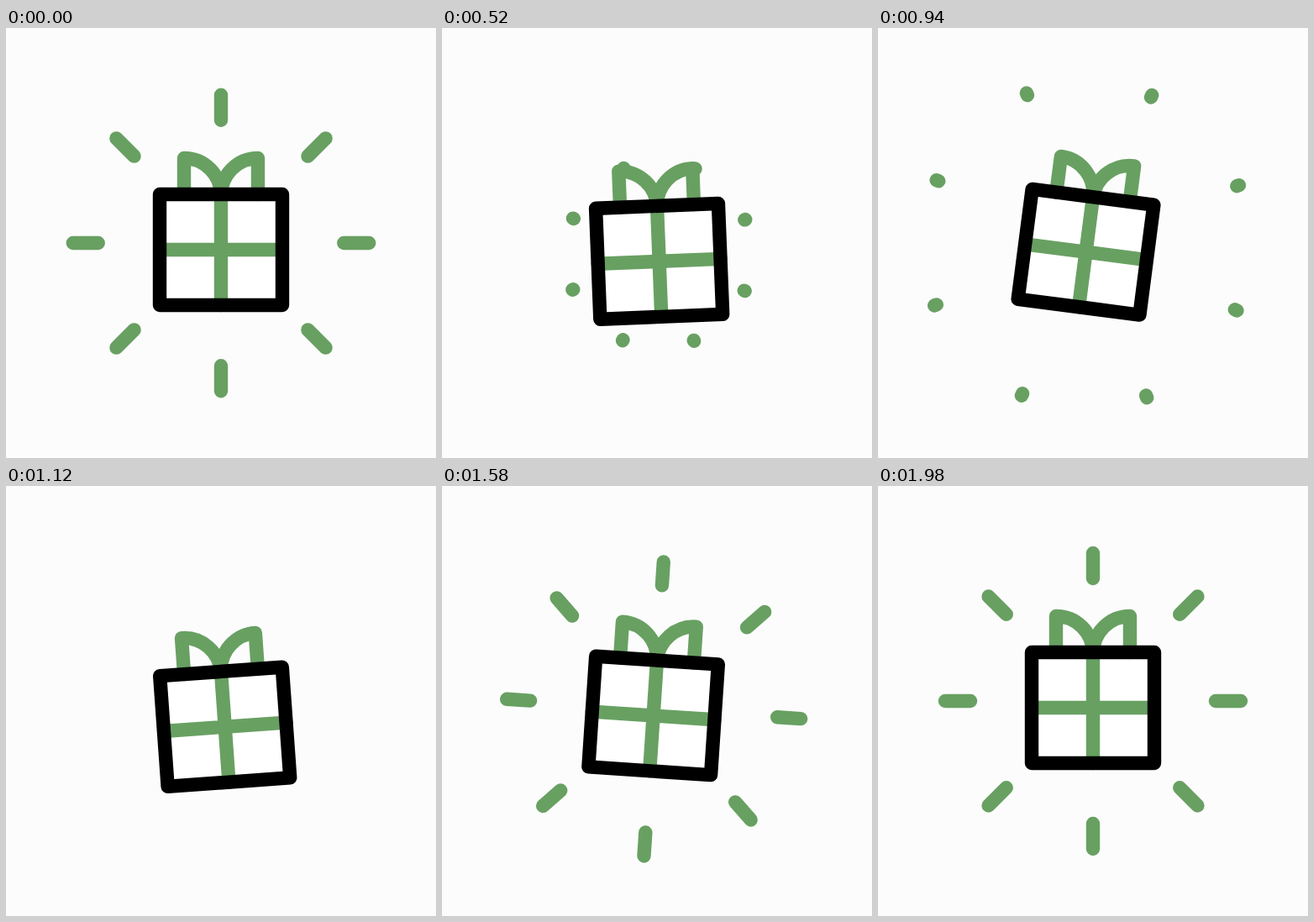
Recreate the animation shown at these times as an HTML page. Size 512x512 px, loop 2 s.

```html
<!DOCTYPE html>
<html lang="en">
<head>
<meta charset="utf-8">
<title>Bouncing gift</title>
<style>
  html, body { margin: 0; width: 100%; height: 100%; overflow: hidden; background: #fcfcfc; }
  svg { display: block; width: 100%; height: 100%; }
  path, rect { fill: none; stroke-width: 16.4; stroke-linecap: round; stroke-linejoin: round; }
  .green { stroke: #68a062; }
  .box { stroke: #000; }
</style>
</head>
<body>
<svg viewBox="0 0 512 512">
  <path id="firstRays" class="green"/>
  <g id="gift">
    <path id="rays" class="green"/>
    <rect x="183" y="198" width="146" height="132" style="fill:#fff"/>
    <path class="green" d="M212 198V155A44 44 0 0 1 256 199A44 44 0 0 1 300 155V198M256 198V330M183 264H329"/>
    <rect class="box" x="183" y="198" width="146" height="132"/>
  </g>
</svg>
<script>
const LOOP = 2000;
const PIVOT_Y = 198;
const byId = id => document.getElementById(id);
const gift = byId('gift'), rays = byId('rays'), firstRays = byId('firstRays');

// Smooth curve through [time, value] keys, flat at every peak.
function curve(...keys) {
  const slope = i => (keys[i + 1][1] - keys[i][1]) / (keys[i + 1][0] - keys[i][0]);
  const tangents = keys.map((_, i) => {
    if (i === 0 || i === keys.length - 1) return 0;
    const a = slope(i - 1), b = slope(i);
    return a * b <= 0 ? 0 : 2 * a * b / (a + b);
  });
  return t => {
    if (t <= keys[0][0]) return keys[0][1];
    const i = keys.findIndex(key => key[0] > t) - 1;
    if (i < 0) return keys[keys.length - 1][1];
    const [t0, v0] = keys[i], [t1, v1] = keys[i + 1];
    const d = t1 - t0, u = (t - t0) / d, w = 1 - u;
    return v0 * (1 + 2 * u) * w * w + v1 * u * u * (3 - 2 * u)
      + d * u * w * (tangents[i] * w - tangents[i + 1] * u);
  };
}

const drop = curve([0, 0], [270, 30.8], [520, 14], [730, -29], [780, -25.5], [870, -8],
  [980, 9], [1090, 24], [1120, 23], [1410, -10], [1580, 9.5], [1632, 13], [1980, 0]);
const tilt = curve([0, 0], [270, -4.1], [520, -2.3], [780, 11.6], [855, 19], [980, 2],
  [1090, -4.1], [1120, -4.1], [1410, 0], [1580, 3.8], [1620, 4.1], [1980, 0]);

const bursts = [
  { from: 0, to: 200, turn: () => 0,
    outer: curve([-60, 160], [0, 176], [100, 195]),
    inner: curve([-60, 130], [0, 146], [200, 195]) },
  { from: 508, to: 985, turn: t => 25.2 - (t - 520) * 0.0217,
    outer: curve([500, 110], [520, 111], [780, 176], [820, 186], [870, 195]),
    inner: curve([510, 110], [780, 160.5], [985, 195]) },
  { from: 1190, to: LOOP, turn: () => 0,
    outer: curve([1180, 110], [1400, 175.4], [1580, 175.4], [1980, 176]),
    inner: curve([1200, 110], [1430, 147.4], [1580, 147.4], [1980, 146]) }
];

function rayPath(burst, t) {
  const outer = burst.outer(t), inner = Math.min(burst.inner(t), outer - 0.1);
  let d = '';
  for (let i = 0; i < 8; i++) {
    const a = (burst.turn(t) + i * 45) * Math.PI / 180;
    const point = r => `${(256 + r * Math.sin(a)).toFixed(2)} ${(256 - r * Math.cos(a)).toFixed(2)}`;
    d += `M${point(inner)}L${point(outer)}`;
  }
  return d;
}

function draw(t) {
  gift.setAttribute('transform', `translate(0 ${drop(t)}) rotate(${tilt(t)} 256 ${PIVOT_Y})`);
  const active = bursts.find(b => t >= b.from && t < b.to);
  const d = active ? rayPath(active, t) : '';
  // The opening burst stays in place while the gift ducks.
  firstRays.setAttribute('d', active === bursts[0] ? d : '');
  rays.setAttribute('d', active === bursts[0] ? '' : d);
}

const start = performance.now();
function tick() {
  draw((performance.now() - start) % LOOP);
  requestAnimationFrame(tick);
}
draw(0);
requestAnimationFrame(tick);
</script>
</body>
</html>
```
